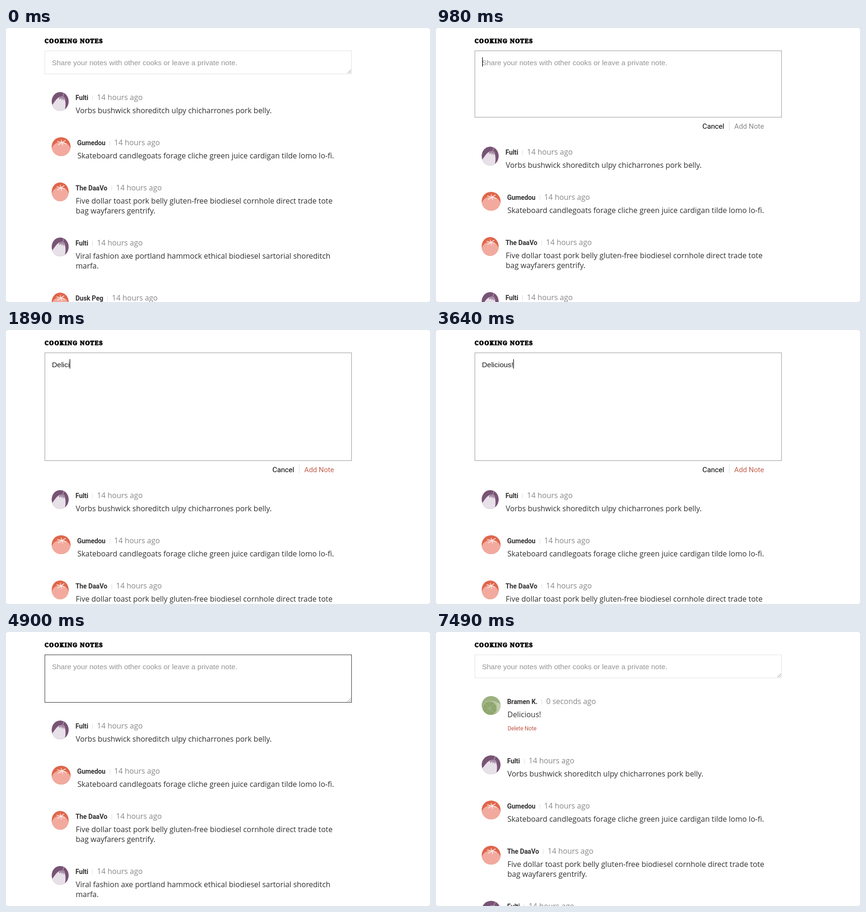
An HTML page that plays this animation: 900 by 582 pixels, repeating every 7.63 s.

```html
<!DOCTYPE html>
<html lang="en">
<head>
<meta charset="utf-8">
<title>Cooking notes</title>
<style>
  html, body { margin: 0; height: 100%; overflow: hidden; background: #fff; }
  svg { display: block; width: 900px; height: 582px; }
  text { white-space: pre; }
  .title { font: 700 12.5px "Noto Serif", serif; letter-spacing: 1.25px; stroke: #000; stroke-width: 1.1px; }
  .input { font: 15.4px "Liberation Sans", Arial, sans-serif; fill: #1a1a1a; }
  .hint { fill: #949494; }
  .button { font: 15.2px Roboto, sans-serif; }
  .name { font: 700 14px Roboto, sans-serif; letter-spacing: -.1px; fill: #333; }
  .time, .body { font: 16px "Open Sans", sans-serif; letter-spacing: -.03px; }
  .time { fill: #888; }
  .body { fill: #333; }
  .delete { font: 12px Roboto, sans-serif; letter-spacing: -.1px; fill: #bf5a4e; }
  .rule { stroke: #ddd; }
</style>
</head>
<body>
<svg viewBox="0 0 900 582">
  <defs>
    <clipPath id="round"><circle cx="20" cy="20" r="20"/></clipPath>
    <g id="eggplant" clip-path="url(#round)">
      <rect width="40" height="40" fill="#785474"/>
      <path d="M0 29C7 21 12 12 20 10L30 11C33 20 34 30 30 40H0Z" fill="#e8e0e8"/>
      <path d="M17 12Q24 6 31 12L32 20 29 14 28 19 26 14 23 18 23 13 18 16Z" fill="#a68ba6"/>
      <path d="M26 10L29 2" stroke="#a68ba6" stroke-width="2"/>
    </g>
    <g id="tomato" clip-path="url(#round)">
      <rect width="40" height="40" fill="#df664b"/>
      <ellipse cx="20" cy="27" rx="20" ry="17" fill="#f2aa9f"/>
      <path d="M22 11L12 9M22 11L14 16M22 11L23 17M22 11L31 14M22 11L29 7M22 11L20 6"
        stroke="#fbe9e4" stroke-width="1.6" stroke-linecap="round"/>
    </g>
    <g id="lime" clip-path="url(#round)">
      <rect width="40" height="40" fill="#9cb080"/>
      <path d="M8 12Q26 6 40 18V34Q30 40 26 32Z" fill="#b9c7a2"/>
      <path d="M34 15V30M37 17V29" stroke="#e6ecdc" stroke-width="1.5" stroke-dasharray="1.5 2.5"/>
      <circle cx="17" cy="26" r="15.5" fill="#adbe92"/>
      <circle cx="17" cy="26" r="14" fill="#8da56c"/>
      <path d="M3 26H31M17 12V40M7 16L27 36M27 16L7 36" stroke="#a3b687" stroke-width="1.2"/>
    </g>
  </defs>
  <rect width="900" height="582" fill="#aaa"/>
  <rect width="900" height="582" rx="3" fill="#fff"/>
  <text class="title" x="82" y="32">COOKING NOTES</text>
  <rect id="box" x="82.5" y="48.5" width="651" fill="#fff"/>
  <path id="grip" d="M725 -2L732.5 -9.5M729 -2L732.5 -5.5" stroke="#777" stroke-width=".9"/>
  <text id="hint" class="input hint" x="97.5" y="79">Share your notes with other cooks or leave a private note.</text>
  <text id="typed" class="input" x="97.5" y="79"></text>
  <rect id="caret" y="62" width="1.2" height="20"/>
  <g id="buttons">
    <text class="button" x="565.5" y="24">Cancel</text>
    <path class="rule" d="M622.5 7V27"/>
    <text id="add" class="button" x="633" y="24">Add Note</text>
  </g>
  <g id="before"></g>
  <g id="after"></g>
</svg>
<script>
const $ = id => document.getElementById(id);
const LOOP = 7630, STEP = 70;
const FOCUS = 700, ENABLED = 1400, SUBMIT = 4620, POSTED = 5040;
const GROW = 777, SHRINK = 4645, SLIDE = 400;
const CLOSED = 98, TRAVEL = 180;
const MESSAGE = "Delicious!";
const KEY_TIMES = [1190, 1400, 1540, 1680, 1750, 1890, 1960, 2170, 2310, 2590];

const AGO = "14 hours ago";
const fulti = { avatar: "eggplant", name: "Fulti", time: AGO };
const notes = [
  { ...fulti, lines: ["Vorbs bushwick shoreditch ulpy chicharrones pork belly."] },
  { avatar: "tomato", name: "Gumedou", time: AGO, wide: true,
    lines: ["Skateboard candlegoats forage cliche green juice cardigan tilde lomo lo-fi."] },
  { avatar: "tomato", name: "The DaaVo", time: AGO,
    lines: ["Five dollar toast pork belly gluten-free biodiesel cornhole direct trade tote",
            "bag wayfarers gentrify."] },
  { ...fulti, lines: ["Viral fashion axe portland hammock ethical biodiesel sartorial shoreditch", "marfa."] },
  { avatar: "tomato", name: "Dusk Peg", time: AGO, lines: [] }
];
const posted = { avatar: "lime", name: "Bramen K.", time: "0 seconds ago", lines: [MESSAGE], own: true };

function add(parent, tag, attributes, content = "") {
  const node = document.createElementNS("http://www.w3.org/2000/svg", tag);
  for (const key in attributes) node.setAttribute(key, attributes[key]);
  node.textContent = content;
  return parent.appendChild(node);
}

function buildList(parent, items, allWide) {
  let y = 0;
  for (const { avatar, name, time, lines, wide, own } of items) {
    const size = allWide || wide ? 40 : 36;
    const x = size === 40 ? 151.5 : 148;
    const write = (className, left, base, content) =>
      add(parent, "text", { class: className, x: left, y: y + base }, content);

    add(parent, "use", { href: "#" + avatar, transform: `translate(97 ${y}) scale(${size / 40} 1)` });
    const end = x + write("name", x - .5, 17, name).getComputedTextLength();
    const ruleX = Math.round(end + 8) + .5;
    add(parent, "path", { class: "rule", d: `M${ruleX} ${y + 7}v11` });
    write("time", end + 18, 17, time);
    lines.forEach((line, i) => write("body", x, 45 + 21 * i, line));
    if (own) write("delete", x + .5, 73, "Delete Note");
    y += 75 + 21 * lines.length + (own ? 30 : 0);
  }
}

const swing = (t, start) => {
  const u = Math.min(1, Math.max(0, (t - start) / SLIDE));
  return (1 - Math.cos(Math.PI * u)) / 2;
};
const show = (id, visible) => $(id).setAttribute("visibility", visible ? "visible" : "hidden");

function render(t) {
  const focused = t >= FOCUS && t < SUBMIT;
  const done = t >= POSTED;
  const open = done ? 0 : swing(t, GROW) - swing(t, SHRINK);
  const bottom = Math.round(CLOSED + TRAVEL * open);

  $("box").setAttribute("height", bottom - 49);
  $("box").setAttribute("stroke", focused ? "#999" : t >= SUBMIT && !done ? "#333" : "#e2e2e2");
  $("grip").setAttribute("transform", `translate(0 ${bottom})`);
  show("grip", !focused);

  const count = focused ? KEY_TIMES.filter(k => k <= t).length : 0;
  $("typed").textContent = MESSAGE.slice(0, count);
  show("hint", !count);
  const width = count ? $("typed").getComputedTextLength() : 0;
  $("caret").setAttribute("x", Math.round(97.5 + width));
  show("caret", focused && !(t >= 3150 && t < 3640) && t < 4200);

  $("buttons").setAttribute("transform", `translate(0 ${bottom})`);
  show("buttons", focused);
  $("add").setAttribute("fill", t >= ENABLED ? "#c4604f" : "#888");

  const listShift = `translate(0 ${bottom + (focused ? 62 : 38)})`;
  $("before").setAttribute("transform", listShift);
  $("after").setAttribute("transform", listShift);
  show("before", !done);
  show("after", done);
}

buildList($("before"), notes, false);
buildList($("after"), [posted, ...notes], true);

const origin = performance.now();
function tick() {
  const t = (performance.now() - origin) % LOOP;
  render(Math.floor(t / STEP) * STEP);
  requestAnimationFrame(tick);
}
tick();
</script>
</body>
</html>
```
